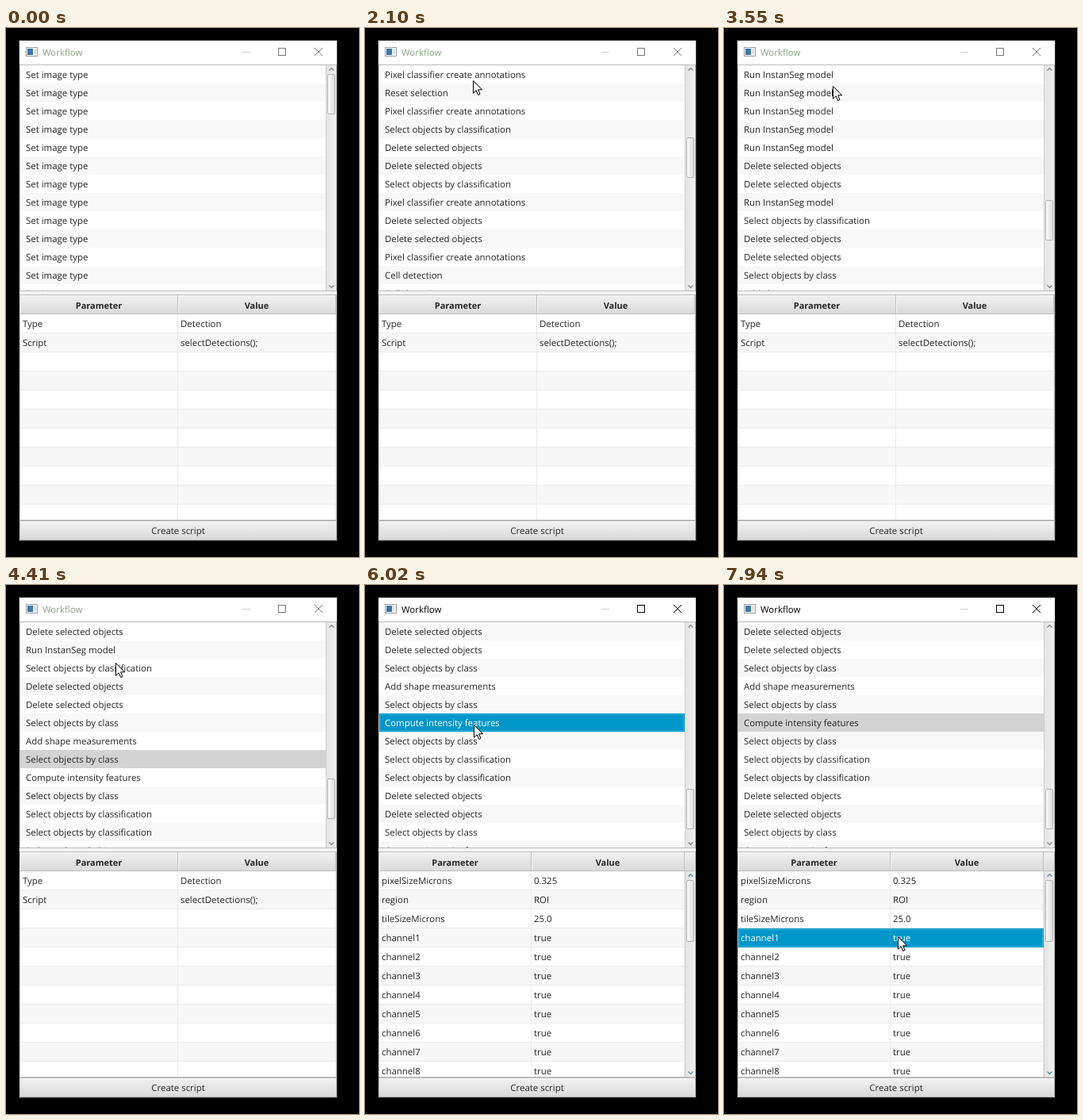
An HTML page that plays this animation: 445x667 px, repeating every 8 s.

```html
<!DOCTYPE html>
<html lang="en">
<head>
<meta charset="utf-8">
<title>Workflow</title>
<style>
* { box-sizing: border-box; }
:root { --focus-ring: inset 0 0 0 1px #0096c9, inset 0 0 0 2px #35add7; }
html, body { margin: 0; width: 100%; height: 100%; overflow: hidden; background: #000; }
body {
  font: 11.45px "Open Sans", "Noto Sans", sans-serif;
  color: #262626;
  white-space: nowrap;
  text-rendering: geometricPrecision;
}
#stage { position: absolute; left: 0; top: 0; width: 445px; height: 667px; overflow: hidden; }
#stage div { position: absolute; }
.timed { animation: 8s step-end infinite; }

#window { left: 16px; top: 15px; width: 402px; height: 632px; border: 1px solid; background: #f4f4f4; animation-name: frame; }
#titlebar { left: 17px; top: 16px; width: 400px; height: 30px; background: #fff; }
#title { left: 29px; line-height: 32px; animation-name: title; }
#titlebar svg { position: absolute; left: 0; top: 0; }
#buttons { stroke: currentColor; animation-name: buttons; }

.panel { left: 17px; width: 400px; background: #fff; border: 1px solid #bcbcbc; overflow: hidden; }
#list { top: 46px; height: 286px; --step: 0; animation-name: scroll; }
#rows { left: 0; top: calc(var(--step) * -69px); width: 385px; }
#stage #rows div { position: static; height: 23px; padding-left: 7px; line-height: 25px; background: #fff; }
#stage #rows div:nth-child(even) { background: #f8f8f8; }
#rows .previous { animation-name: previous; }
#rows .chosen { animation-name: chosen; }

.bar { right: 0; width: 13px; background: linear-gradient(90deg, #e4e4e4, #efefef); border-left: 1px solid #cfcfcf; }
.bar svg { position: absolute; left: 2px; fill: none; stroke: #828282; stroke-width: 1.2; }
.bar svg:first-child { top: 2px; }
.bar svg:last-child { bottom: 2px; }
.thumb { left: 1px; width: 10px; border: 1px solid #b4b4b4; border-radius: 2px; background: linear-gradient(90deg, #fafafa, #dedede); }
#list .bar { top: 0; height: 284px; }
#list .thumb { top: calc(11px + var(--step) * 13.27px); height: 51px; }

.table { top: 336px; height: 285px; }
#details { animation-name: appear; }
#details .bar { top: 24px; height: 259px; }
#details .bar svg { stroke: #4f88a8; }
#details .thumb { top: 11px; height: 78px; }
.head, .line { left: 0; width: 398px; height: 24px; line-height: 26px; }
.head { font-weight: bold; font-size: 11px; text-align: center; background: linear-gradient(#f1f1f1, #dadada); border-bottom: 1px solid #c0c0c0; }
.head div { height: 23px; line-height: 27px; border-right: 1px solid #c2c2c2; box-shadow: inset 1px 1px #f6f6f6; }
.line { --rule: #ececec; background: #fff; box-shadow: inset 0 -1px #ececec; }
.line:nth-child(odd) { background: #f7f7f7; }
.line div { height: 24px; padding-left: 3px; border-right: 1px solid var(--rule); }
#details .line { width: 385px; }
#details .line:nth-child(5) { animation: picked 8s step-end infinite; }

#create { left: 17px; top: 621px; width: 400px; height: 25px; line-height: 26px; text-align: center; border: 1px solid #b8b8b8; background: linear-gradient(#f1f1f1, #dadada); box-shadow: inset 0 1px #fafafa; }
#pointer { position: absolute; left: 0; top: 0; overflow: visible; animation-name: pointer; }

@keyframes frame { 0% { border-color: #343434; } 74.375%, 100% { border-color: #181818; } }
@keyframes title { 0% { color: #8ba285; } 74.375%, 100% { color: #000; } }
@keyframes buttons { 0% { color: #777; } 74.375%, 100% { color: #000; } }
@keyframes appear { 0% { opacity: 0; } 75.25%, 100% { opacity: 1; } }
@keyframes previous { 0% { background: #d3d3d3; } 75.25%, 100% { background: #f8f8f8; } }
@keyframes chosen {
  0% { background: #fff; color: #262626; box-shadow: none; }
  75.25% { background: #0096c9; color: #fff; box-shadow: var(--focus-ring); }
  88.125%, 100% { background: #d3d3d3; color: #262626; box-shadow: none; }
}
@keyframes picked {
  0% { background: #f7f7f7; color: #262626; box-shadow: inset 0 -1px #ececec; --rule: #ececec; }
  88.125%, 100% { background: #0096c9; color: #fff; box-shadow: var(--focus-ring); --rule: #1fa4d1; }
}
@keyframes scroll {
  0% { --step: 0; }
  11.125% { --step: 1; }
  14.375% { --step: 2; }
  16% { --step: 3; }
  18.5% { --step: 4; }
  23.5% { --step: 5; }
  26.25% { --step: 6; }
  28.75% { --step: 7; }
  31.25% { --step: 8; }
  38.625% { --step: 9; }
  41.125% { --step: 10; }
  42.75% { --step: 11; }
  44.375% { --step: 12; }
  53.5% { --step: 13; }
  55.125% { --step: 14; }
  65%, 100% { --step: 15; }
}
@keyframes pointer {
  0% { opacity: 0; transform: translate(269px, 410px); }
  1.625% { opacity: 1; transform: translate(269px, 410px); animation-timing-function: steps(3); }
  4.25% { transform: translate(190px, 190px); animation-timing-function: steps(4); }
  7.75% { transform: translate(136px, 61px); }
  23.5% { transform: translate(136px, 62px); animation-timing-function: steps(3); }
  26.25% { transform: translate(136px, 66px); animation-timing-function: steps(4); }
  32% { transform: translate(136px, 71px); }
  38.625% { transform: translate(137px, 73px); }
  47.625% { transform: translate(137px, 82px); animation-timing-function: steps(2); }
  49.375% { transform: translate(138px, 98px); }
  65% { transform: translate(138px, 104px); animation-timing-function: steps(9); }
  74.375% { transform: translate(137px, 176px); }
  77.875% { transform: translate(139px, 205px); animation-timing-function: steps(3); }
  80.75% { transform: translate(190px, 380px); animation-timing-function: steps(2); }
  83.25% { transform: translate(235px, 509px); animation-timing-function: steps(2); }
  85.5% { transform: translate(140px, 480px); animation-timing-function: steps(2); }
  87.25% { transform: translate(83px, 452px); }
  88.125% { transform: translate(87px, 451px); }
  91.5% { transform: translate(105px, 450px); animation-timing-function: steps(4); }
  95.5% { transform: translate(246px, 449px); animation-timing-function: steps(4); }
  99.25%, 100% { opacity: 1; transform: translate(219px, 443px); }
}
</style>
</head>
<body>
<div id="stage">
  <div id="window" class="timed"></div>
  <div id="titlebar">
    <svg width="400" height="30" fill="none">
      <rect x="8.5" y="8.5" width="14" height="11" fill="#f2f4f5" stroke="#9aa2a7"/>
      <rect x="10" y="10" width="7" height="8" fill="#3f78a6"/>
      <path d="M18 11.5h3M18 13.5h3M18 15.5h3" stroke="#ccd2d5"/>
      <path d="M281 14.5h10" stroke="#d0d0d0"/>
      <g id="buttons" class="timed">
        <rect x="326.5" y="9.5" width="9" height="9"/>
        <path d="M372 9l10 10M382 9l-10 10"/>
      </g>
    </svg>
    <div id="title" class="timed">Workflow</div>
  </div>
  <div id="list" class="panel timed"><div id="rows"></div></div>
  <div id="summary" class="panel table"></div>
  <div id="details" class="panel table timed"></div>
  <div id="create">Create script</div>
  <svg id="pointer" class="timed" width="13" height="20">
    <path d="M.5 .5V16.2L4.2 12.7L6.7 18.5L9 17.5L6.6 11.8H11.6Z" fill="#fff" stroke="#000"/>
  </svg>
</div>
<script>
const byId = id => document.getElementById(id);

const labels = {
  T: "Set image type",
  F: "Select objects by classification",
  S: "Select objects by class",
  N: "Create full image annotation",
  D: "Delete selected objects",
  P: "Pixel classifier create annotations",
  R: "Reset selection",
  C: "Cell detection",
  I: "Run InstanSeg model",
  A: "Add shape measurements",
  M: "Compute intensity features"
};
const workflow = "T".repeat(13) + "FNDDSPRPFDDFPDDPCCCDDII" + "IIIIIDDIFDDSASMSFFDDSMD";
const marks = { 49: "previous timed", 50: "chosen timed" };

byId("rows").innerHTML = [...workflow]
  .map((key, i) => `<div class="${marks[i] || ""}">${labels[key]}</div>`).join("");

const arrow = path => `<svg width="9" height="6"><path d="${path}"/></svg>`;
const scrollbar = `<div class="bar">${arrow("M1.5 4.5l3-3l3 3")}<div class="thumb"></div>${arrow("M1.5 1.5l3 3l3-3")}</div>`;

function fillTable(table, widths, values) {
  const cells = texts => texts.map((text, i) =>
    `<div style="left:${i * widths[0]}px;width:${widths[i]}px">${text}</div>`).join("");
  let html = `<div class="head">${cells(["Parameter", "Value"])}</div>`;
  for (let i = 0; i < 11; i++)
    html += `<div class="line" style="top:${24 + i * 24}px">${cells(values[i] || ["", ""])}</div>`;
  table.innerHTML = html;
}

const channels = Array.from({ length: 8 }, (_, i) => ["channel" + (i + 1), "true"]);
fillTable(byId("summary"), [199, 199], [["Type", "Detection"], ["Script", "selectDetections();"]]);
fillTable(byId("details"), [192, 193],
  [["pixelSizeMicrons", "0.325"], ["region", "ROI"], ["tileSizeMicrons", "25.0"], ...channels]);

for (const id of ["list", "details"]) byId(id).insertAdjacentHTML("beforeend", scrollbar);
</script>
</body>
</html>
```
